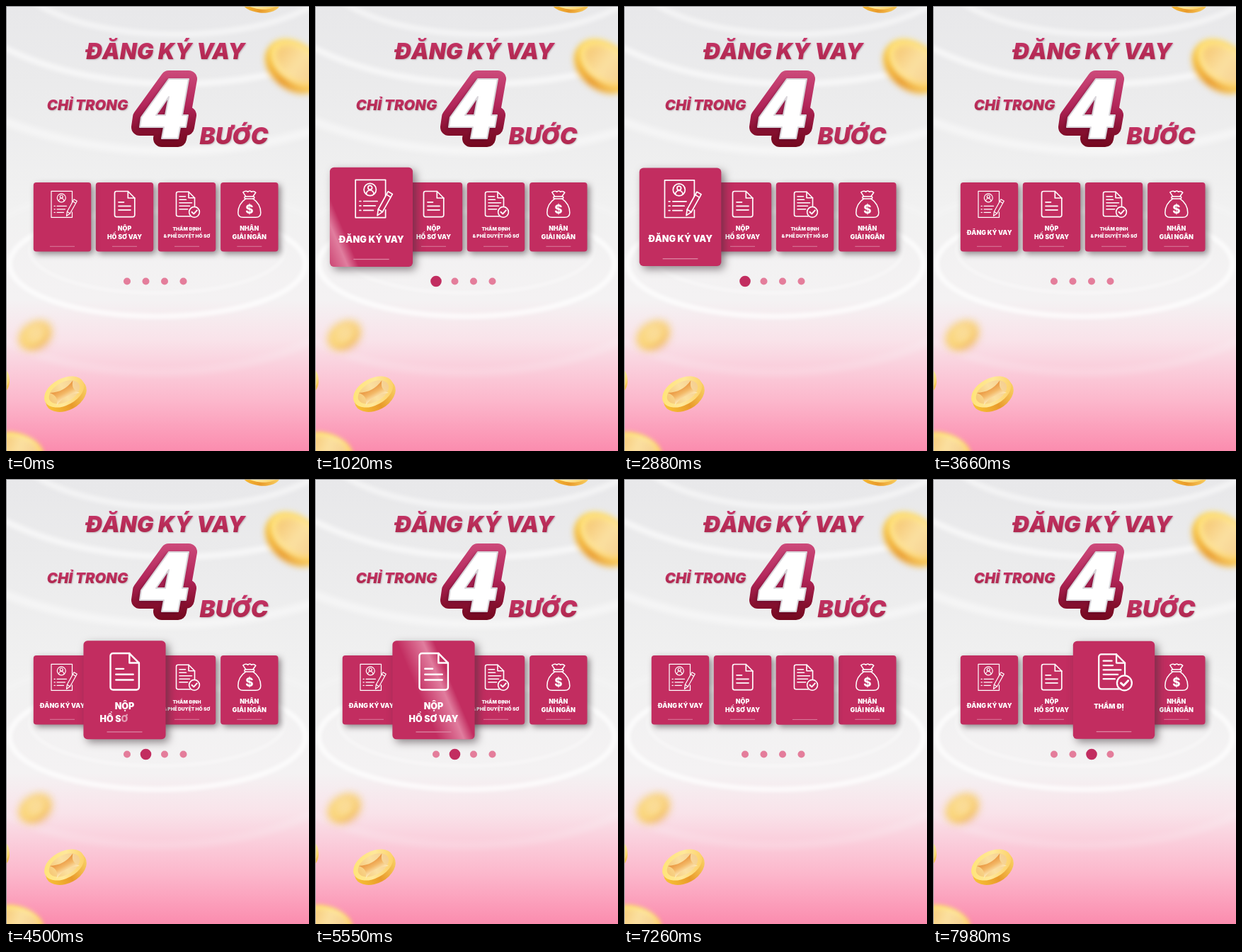
Write an HTML page with a canvas that moves like this. It is 428 by 628 pixels and loops after 8 s.

```html
<!DOCTYPE html>
<html lang="vi">
<head>
<meta charset="utf-8">
<title>Đăng ký vay</title>
<style>
html, body { margin: 0; width: 100%; height: 100%; overflow: hidden; background: #f0f0f1; }
canvas { display: block; width: 428px; height: 628px; }
</style>
</head>
<body>
<canvas id="stage" width="428" height="628"></canvas>
<script>
const W = 428, H = 628, LOOP = 8000, TAU = Math.PI * 2;
const FONT = 'Inter, "Open Sans", sans-serif';
const ctx = document.getElementById('stage').getContext('2d');

const clamp = v => Math.max(0, Math.min(1, v));
const smooth = v => { v = clamp(v); return v * v * (3 - 2 * v); };

function ellipse(c, x, y, rx, ry, rot = 0) {
  c.beginPath();
  c.ellipse(x, y, rx, ry, rot, 0, TAU);
}

function trace(c, pts) {
  pts.forEach(([x, y], i) => i ? c.lineTo(x, y) : c.moveTo(x, y));
}

function poly(c, pts, close) {
  c.beginPath();
  trace(c, pts);
  if (close) c.closePath();
}

function ramp(c, x0, y0, x1, y1, stops) {
  const g = c.createLinearGradient(x0, y0, x1, y1);
  stops.forEach(([at, color]) => g.addColorStop(at, color));
  return g;
}

/* ---------- still backdrop ---------- */

function ring(c, x, y, rx, ry, width, alpha, blur) {
  c.save();
  c.filter = `blur(${blur}px)`;
  c.strokeStyle = `rgba(255,255,255,${alpha})`;
  c.lineWidth = width;
  ellipse(c, x, y, rx, ry);
  c.stroke();
  c.restore();
}

function coin(c, x, y, rx, ry, rot, blur, hole) {
  c.save();
  if (blur) c.filter = `blur(${blur}px)`;
  c.translate(x, y);
  c.rotate(rot);
  c.fillStyle = ramp(c, -rx, 0, rx, 0, [[0, '#f7c036'], [.5, '#e99a2a'], [1, '#f8cf62']]);
  ellipse(c, 0, ry * .18, rx, ry);
  c.fill();
  c.fillStyle = ramp(c, -rx, -ry, rx, ry, [[0, '#ffe26e'], [.5, '#ffe89a'], [1, '#fbc755']]);
  ellipse(c, 0, -ry * .08, rx * .98, ry * .9);
  c.fill();
  c.fillStyle = ramp(c, -rx, 0, rx, 0, [[0, '#f4c169'], [.5, '#fbe0a0'], [1, '#f3c98c']]);
  ellipse(c, 0, -ry * .06, rx * .76, ry * .66);
  c.fill();
  if (hole) {
    const a = rx * .6, b = ry * .48;
    c.beginPath();
    c.moveTo(-a, -b);
    c.quadraticCurveTo(0, -b * .1, a, -b);
    c.quadraticCurveTo(a * .5, 0, a, b);
    c.quadraticCurveTo(0, b * .1, -a, b);
    c.quadraticCurveTo(-a * .5, 0, -a, -b);
    c.fillStyle = ramp(c, 0, -b, 0, b, [[0, '#e8903a'], [.5, '#f3b866'], [1, '#fff0c4']]);
    c.fill();
  }
  c.restore();
}

function title(c, text, x, y, size) {
  c.font = `italic 900 ${size}px ${FONT}`;
  c.textAlign = 'center';
  c.textBaseline = 'alphabetic';
  c.save();
  c.shadowColor = 'rgba(110,80,95,.35)';
  c.shadowOffsetX = 1;
  c.shadowOffsetY = 1;
  c.shadowBlur = 2;
  c.fillStyle = ramp(c, 0, y - size, 0, y, [[0, '#c9356a'], [1, '#b0284f']]);
  c.fillText(text, x, y);
  c.restore();
}

function bigFour(c) {
  const outer = [[230, 103], [258, 103], [249, 154], [257, 154], [254, 171], [246, 171],
    [243, 187], [220, 187], [223, 171], [189, 171], [191, 157]];
  const hole = [[230, 128], [212, 154], [225, 154]];
  c.save();
  c.lineJoin = 'round';
  poly(c, outer, true);
  c.fillStyle = c.strokeStyle = ramp(c, 0, 92, 0, 198,
    [[0, '#cc4a7a'], [.45, '#b3265a'], [.8, '#86102f'], [1, '#74081f']]);
  c.lineWidth = 24;
  c.fill();
  c.stroke();

  c.beginPath();
  for (const shape of [outer, hole]) {
    trace(c, shape);
    c.closePath();
  }
  c.shadowColor = 'rgba(70,0,30,.55)';
  c.shadowBlur = 5;
  c.shadowOffsetX = -2;
  c.shadowOffsetY = 2;
  c.fillStyle = '#fff';
  c.fill('evenodd');
  c.shadowColor = 'transparent';
  c.lineWidth = 2;
  c.strokeStyle = '#d9d5da';
  c.stroke();
  c.restore();
}

function backdrop() {
  const still = document.createElement('canvas');
  still.width = W;
  still.height = H;
  const c = still.getContext('2d');
  c.fillStyle = ramp(c, 0, 0, 0, H, [[0, '#e8e8ea'], [.18, '#ebebec'], [.45, '#f1f1f1'],
    [.66, '#f4f2f3'], [.75, '#f9e3ea'], [.89, '#fcb6cb'], [1, '#fb8cae']]);
  c.fillRect(0, 0, W, H);

  ring(c, 240, -50, 230, 90, 7, .6, 3);
  ring(c, 240, -50, 330, 160, 8, .65, 3);
  ring(c, 235, -40, 420, 245, 10, .55, 4);
  ring(c, 214, 364, 209, 74, 7, .75, 2.5);
  ring(c, 214, 345, 180, 60, 4, .45, 2);
  ring(c, 214, 385, 290, 132, 9, .2, 4);

  coin(c, 360, -7, 27, 14, .1, .5);
  coin(c, 410, 83, 45, 31, .65, 4.5);
  coin(c, 41, 464, 22, 15, -.6, 7);
  coin(c, -10, 527, 15, 18, 0, .5);
  coin(c, 83, 546, 31, 21, -.5, 0, true);
  coin(c, 18, 624, 36, 21, .35, 3);

  title(c, 'ĐĂNG KÝ VAY', 224.5, 75, 31.3);
  title(c, 'CHỈ TRONG', 115, 147, 20.3);
  title(c, 'BƯỚC', 322, 195, 33);
  bigFour(c);

  c.fillStyle = '#8d8d90';
  c.fillRect(0, 0, W, 1);
  c.fillRect(0, 0, 1, H);
  return still;
}

/* ---------- icons, around the card centre ---------- */

function line(...pts) {
  poly(ctx, pts);
  ctx.stroke();
}

function sheet(x0, x1, y0, y1, fold) {
  ctx.beginPath();
  ctx.moveTo(x1 - fold, y0);
  ctx.lineTo(x1, y0 + fold);
  ctx.arcTo(x1, y1, x0, y1, 2.5);
  ctx.arcTo(x0, y1, x0, y0, 2.5);
  ctx.arcTo(x0, y0, x1, y0, 2.5);
  ctx.closePath();
  ctx.stroke();
  line([x1 - fold, y0], [x1 - fold, y0 + fold], [x1, y0 + fold]);
}

function circle(x, y, r) {
  ellipse(ctx, x, y, r, r);
  ctx.stroke();
}

function formIcon() {
  ctx.lineWidth = 1.2;
  line([14, -20], [14, -36.5], [-15.5, -36.5], [-15.5, .5], [14, .5], [14, -7]);
  circle(-1.2, -27, 6);
  circle(-1.2, -28.8, 2);
  ctx.beginPath();
  ctx.arc(-1.2, -22.6, 3.7, Math.PI, TAU);
  ctx.stroke();
  [[-15.5, 6], [-11, 4], [-6.5, 2]].forEach(([y, end]) => {
    line([-11.5, y], [-10.2, y]);
    line([-7.5, y], [end, y]);
  });
  poly(ctx, [[6, -1.5], [6.8, -7.5], [16.5, -25], [20.8, -22.5], [11, -5]], true);
  ctx.fillStyle = '#c22d60';
  ctx.fill();
  ctx.stroke();
  line([15, -22], [19, -19.5]);
  line([6.8, -7.5], [11, -5]);
}

function pageIcon() {
  ctx.lineWidth = 1.7;
  sheet(-14, 14.3, -36.3, -.2, 9.5);
  line([-8.5, -21], [-1, -21]);
  line([-8.5, -15.5], [8.5, -15.5]);
  line([-8.5, -10], [8.5, -10]);
}

function checkIcon() {
  ctx.lineWidth = 1.6;
  sheet(-15, 11, -35.5, -1, 8.5);
  line([-10.5, -29], [-2, -29]);
  line([-10.5, -24.5], [-1, -24.5]);
  [-20, -15.5, -11].forEach((y, i) => line([-10.5, y], [7 - i * 3, y]));
  ctx.fillStyle = '#c22d60';
  ellipse(ctx, 10.5, -7, 8, 8);
  ctx.fill();
  circle(10.5, -7, 7.4);
  ctx.lineWidth = 2;
  line([7, -7], [9.7, -4.4], [14.3, -9.4]);
}

function bagIcon() {
  ctx.lineWidth = 1.5;
  ctx.beginPath();
  ctx.moveTo(-5, -26);
  ctx.bezierCurveTo(-14, -20, -16, -11, -16, -6);
  ctx.quadraticCurveTo(-16, .5, -9, .5);
  ctx.lineTo(9, .5);
  ctx.quadraticCurveTo(16, .5, 16, -6);
  ctx.bezierCurveTo(16, -11, 14, -20, 5, -26);
  ctx.stroke();
  ctx.beginPath();
  ctx.moveTo(-5, -29);
  ctx.lineTo(-9, -35);
  ctx.quadraticCurveTo(-5, -38, -2, -35.5);
  ctx.quadraticCurveTo(0, -38, 3, -35.5);
  ctx.quadraticCurveTo(6, -37.5, 9, -34.5);
  ctx.lineTo(5, -29);
  ctx.stroke();
  ctx.beginPath();
  ctx.roundRect(-7, -29, 14, 3.2, 1.6);
  ctx.stroke();
  ctx.fillStyle = '#fff';
  ctx.textAlign = 'center';
  ctx.font = `800 17px ${FONT}`;
  ctx.fillText('$', 0, -5);
}

/* ---------- cards ---------- */

// Each line: text, size, baseline below the card centre.
const cards = [
  { x: 79.5, icon: formIcon, lines: [['ĐĂNG KÝ VAY', 8.9, 25]], start: 0, type: 300, end: 3020 },
  { x: 167.5, icon: pageIcon, lines: [['NỘP', 8.8, 19], ['HỒ SƠ VAY', 8.8, 31.5]], start: 4000, type: 200, end: 6260 },
  { x: 255.5, icon: checkIcon, lines: [['THẨM ĐỊNH', 6.7, 18.7], ['& PHÊ DUYỆT HỒ SƠ', 6.6, 29.4]], start: 7240, type: 460, end: 9500 },
  { x: 343.8, icon: bagIcon, lines: [['NHẬN', 8.8, 19], ['GIẢI NGÂN', 9, 31.5]], start: Infinity, end: Infinity }
];
const CY = 297.8, HW = 40.7, HH = 48.7, PER_CHAR = 40;

const raise = (card, t) => smooth((t - card.start) / 400) * (1 - smooth((t - card.end) / 500));

function label(card, rel) {
  let typed = rel < 0 ? Infinity : (rel - card.type) / PER_CHAR;
  ctx.fillStyle = '#fff';
  ctx.textAlign = 'left';
  for (const [text, size, y] of card.lines) {
    ctx.font = `900 ${size}px ${FONT}`;
    const left = -ctx.measureText(text).width / 2;
    const whole = Math.floor(typed);
    if (typed >= text.length) {
      ctx.fillText(text, left, y);
    } else if (typed > 0) {
      const done = text.slice(0, whole);
      ctx.fillText(done, left, y);
      ctx.globalAlpha = typed - whole;
      ctx.fillText(text[whole], left + ctx.measureText(done).width, y);
      ctx.globalAlpha = 1;
    }
    typed -= text.length;
  }
}

function sheen(rel) {
  const at = -47 + 97 * (rel - 1020) / 1050;
  if (Math.abs(at) > 80) return;
  ctx.save();
  ctx.clip();
  ctx.rotate(-.4);
  ctx.fillStyle = ramp(ctx, at - 17, 0, at + 17, 0,
    [[0, 'rgba(255,205,220,0)'], [.7, 'rgba(255,205,220,.5)'], [1, 'rgba(255,205,220,0)']]);
  ctx.fillRect(at - 17, -80, 34, 160);
  ctx.restore();
}

function drawCard(card, t) {
  const p = raise(card, t), rel = t - card.start;
  const pulse = p ? .012 * Math.cos(TAU * (rel - 1020) / 700) : 0;
  const scale = 1 + p * (.427 + pulse);
  ctx.save();
  ctx.translate(card.x, CY);
  ctx.scale(scale, scale);
  ctx.beginPath();
  ctx.roundRect(-HW, -HH, HW * 2, HH * 2, 4);
  ctx.save();
  ctx.shadowColor = 'rgba(60,50,55,.55)';
  ctx.shadowBlur = 8 + 4 * p;
  ctx.shadowOffsetX = ctx.shadowOffsetY = 3.5 + p;
  ctx.fillStyle = '#c22d60';
  ctx.fill();
  ctx.restore();
  if (p > 0) sheen(rel);
  ctx.strokeStyle = '#fff';
  ctx.lineCap = ctx.lineJoin = 'round';
  card.icon();
  label(card, rel);
  ctx.fillStyle = '#dc86a3';
  ctx.fillRect(-17.5, 41, 35, .9);
  ctx.restore();
}

function drawDot(card, i, t) {
  const p = raise(card, t);
  const mix = (a, b) => Math.round(a + (b - a) * p);
  ctx.fillStyle = `rgb(${mix(228, 194)},${mix(125, 45)},${mix(155, 96)})`;
  const r = 5 + 2.8 * p;
  ellipse(ctx, 171 + i * 26.5, 388.5, r, r);
  ctx.fill();
}

const still = backdrop();

function frame(now) {
  const t = now % LOOP;
  ctx.drawImage(still, 0, 0);
  ctx.textBaseline = 'alphabetic';
  cards.slice()
    .sort((a, b) => raise(a, t) - raise(b, t))
    .forEach(card => drawCard(card, t));
  cards.forEach((card, i) => drawDot(card, i, t));
  requestAnimationFrame(frame);
}
frame(0);
</script>
</body>
</html>
```
